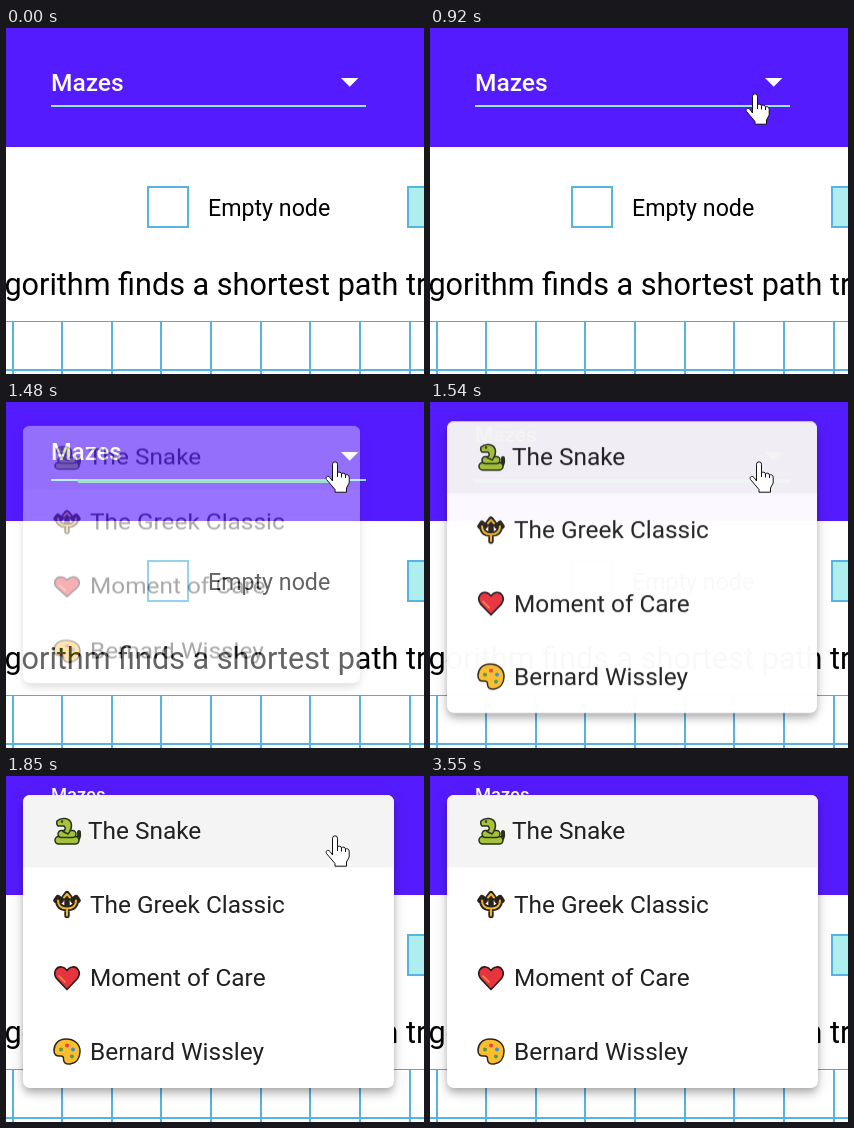
Write an HTML page that moves like this. It is 418 px wide and 346 px high and loops after 4180 ms.

```html
<!DOCTYPE html>
<html lang="en">
<head>
<meta charset="utf-8">
<title>Maze menu</title>
<style>
  html, body { margin: 0; width: 100%; height: 100%; overflow: hidden; background: #fff; }
  #stage { position: relative; width: 418px; height: 346px; overflow: hidden; }
  #stage > * { position: absolute; left: 0; top: 0; }
  svg { display: block; overflow: hidden; }
  text { font-family: Roboto, sans-serif; }

  .label, .focus, .panel, .hover, .cursor { animation: 4180ms step-end infinite; }

  .label { transform-origin: 45px 63px; animation-name: float; }
  @keyframes float {
    0% { transform: none; }
    35.4% { transform: translateY(-4.6px) scale(.97); }
    36.84% { transform: translateY(-23px) scale(.85); }
    38.75% { transform: translateY(-33.4px) scale(.78); }
    40.66% { transform: translateY(-36.5px) scale(.76); }
    44.25%, 100% { transform: translateY(-38px) scale(.75); }
  }

  .focus { transform-origin: 202.5px 78px; animation-name: focus; }
  @keyframes focus {
    0% { opacity: 0; transform: scaleX(.5); }
    33.25% { opacity: .4; transform: scaleX(.55); }
    35.4% { opacity: .9; transform: scaleX(.83); }
    36.84%, 100% { opacity: 1; transform: none; }
  }

  #stage > .panel {
    left: 17px; top: 19px; width: 371px; height: 293px;
    border-radius: 7px; background: #fff; transform-origin: 0 40px;
    box-shadow: 0 3.5px 7px -1.7px rgba(0,0,0,.2), 0 7px 9px rgba(0,0,0,.14), 0 2px 17px rgba(0,0,0,.12);
    animation-name: open;
  }
  .panel svg { border-radius: 7px; }
  @keyframes open {
    0% { opacity: 0; width: 315px; transform: scaleY(.8); }
    35.4% { opacity: .39; width: 337px; transform: scaleY(.878); }
    36.84% { opacity: .98; width: 370px; transform: scaleY(.996); }
    38.75%, 100% { opacity: 1; width: 371px; transform: none; }
  }

  .hover { animation-name: hover; }
  @keyframes hover {
    0% { opacity: 0; transform: translateY(73.5px); }
    77.51% { opacity: 1; transform: translateY(73.5px); }
    79.42% { opacity: 1; transform: translateY(147px); }
    81.33% { opacity: 1; transform: translateY(220.5px); }
    83.01%, 100% { opacity: 0; transform: translateY(220.5px); }
  }

  .cursor { animation-name: point; }
  @keyframes point {
    0% { opacity: 0; transform: translate(342px, 346px); }
    14.59% { opacity: 1; transform: translate(342px, 326px); }
    16.5% { opacity: 1; transform: translate(337px, 246px); }
    18.42% { opacity: 1; transform: translate(326px, 166px); }
    20.33% { opacity: 1; transform: translate(318px, 98px); }
    22% { opacity: 1; transform: translate(315px, 65px); }
    23.68% { opacity: 1; transform: translate(317px, 61px); }
    25.59% { opacity: 1; transform: translate(319px, 59px); }
    77.51% { opacity: 1; transform: translate(341px, 136px); }
    79.42% { opacity: 1; transform: translate(357px, 203px); }
    81.33% { opacity: 1; transform: translate(374px, 268px); }
    83.01% { opacity: 1; transform: translate(391px, 324px); }
    84.92%, 100% { opacity: 0; transform: translate(400px, 346px); }
  }
</style>
</head>
<body>
<div id="stage">
  <svg width="418" height="346">
    <rect width="418" height="119" fill="#551bff"/>
    <rect x="45" y="77" width="315" height="2" fill="#97e9f3"/>
    <rect class="focus" x="45" y="77" width="315" height="4" fill="#69e0ae"/>
    <path d="M335 50H352.4L343.7 58.8Z" fill="#fff"/>
    <text class="label" x="45" y="63" font-size="24.5" font-weight="500" fill="#fff">Mazes</text>

    <g stroke="#55b4e2" stroke-width="2">
      <rect x="142" y="159" width="40" height="40" fill="#fff"/>
      <rect x="402" y="159" width="40" height="40" fill="#afeeee"/>
    </g>
    <text x="202" y="188" font-size="23.2">Empty node</text>
    <text x="-1.6" y="267" font-size="30.6">gorithm finds a shortest path tree</text>
    <g stroke="#55b4e2" shape-rendering="crispEdges">
      <path d="M5.7 319.5H418" stroke-width="53" stroke-dasharray="2 47.6"/>
      <path d="M0 342H418" stroke-width="2"/>
    </g>
    <rect y="293" width="418" height="1" fill="#7f9cac"/>
  </svg>

  <div class="panel">
    <svg width="100%" height="293" viewBox="0 1 371 293" preserveAspectRatio="xMinYMin slice">
      <rect width="371" height="73.5" fill="#f4f4f4"/>
      <rect class="hover" width="371" height="73.5" fill="#f4f4f4"/>
      <g font-size="24.4" fill="#212121">
        <text x="65" y="45.2">The Snake</text>
        <text x="67" y="118.7">The Greek Classic</text>
        <text x="67" y="192.2">Moment of Care</text>
        <text x="67" y="265.7">Bernard Wissley</text>
      </g>
      <g stroke-linecap="round" stroke-linejoin="round" fill="none">
        <g transform="translate(30 23)" stroke="#29301c" stroke-width="1.5">
          <path d="M22 24Q27 22 26 15" stroke-width="4"/>
          <rect x="2" y="19.5" width="24" height="7.5" rx="3.7" fill="#a5c238"/>
          <rect x="5" y="13.5" width="18" height="7" rx="3.5" fill="#a5c238"/>
          <path d="M10 14.5Q14 12 11 9H5Q3 7 4 4Q7 1 12 1.5Q18 2 18.5 8Q18.5 13 15 17Z" fill="#a5c238"/>
          <circle cx="9" cy="4.5" r=".5"/>
        </g>
        <g transform="translate(30 96.5)">
          <path d="M14 4V25M4.5 9Q5 18 14 18Q23 18 23.5 9M3 10L5 7L8 10M25 10L23 7L20 10M11 7L14 3L17 7" stroke="#29231c" stroke-width="5.4"/>
          <path d="M14 18V25M5 10Q5 18 14 18Q23 18 23 10M11 7L14 3.5L17 7" stroke="#f0b62b" stroke-width="2"/>
        </g>
        <g transform="translate(30 170)">
          <path d="M14 25.5L3.5 14.5C-1 8 4 2 9 3Q12 3.5 14 6.5Q16 3.5 19 3C24 2 29 8 24.5 14.5Z" fill="#e8343f" stroke="#28191c" stroke-width="1.6"/>
          <path d="M6 12L12 18" stroke="#f58f49" stroke-width="1.6"/>
        </g>
        <g transform="translate(30 243.5)">
          <path d="M13 1.5C5 1.5 1 7 1 13Q1 19 7 18.5Q11 18 10.5 22Q11 27 17 26.5C24 25.5 27 20 27 14C27 6 21 1.5 13 1.5Z" fill="#fcbd2e" stroke="#2c251c" stroke-width="1.5"/>
          <circle cx="8" cy="12" r="2" fill="#4c9f45"/>
          <circle cx="14" cy="8" r="2" fill="#e8443e"/>
          <circle cx="20" cy="12" r="2" fill="#3a91d5"/>
          <circle cx="19" cy="19" r="2" fill="#4c9f45"/>
        </g>
      </g>
    </svg>
  </div>

  <svg class="cursor" width="26" height="33" fill="none" stroke="#111" stroke-linejoin="round">
    <path d="M7.5 20V3.3a2.5 2.5 0 0 1 5 0V12c1-1.5 4-1 4 1c1-1.5 4-1 4 1.2c1-1 3.7-.5 3.7 2V22L21.5 27V31.2H10V28.5L1.5 18.5C0 16 3 14 5 16.5Z" fill="#fff"/>
    <path d="M12.5 11V16M16.5 13V16.5M20.5 14V17"/>
  </svg>
</div>
</body>
</html>
```
